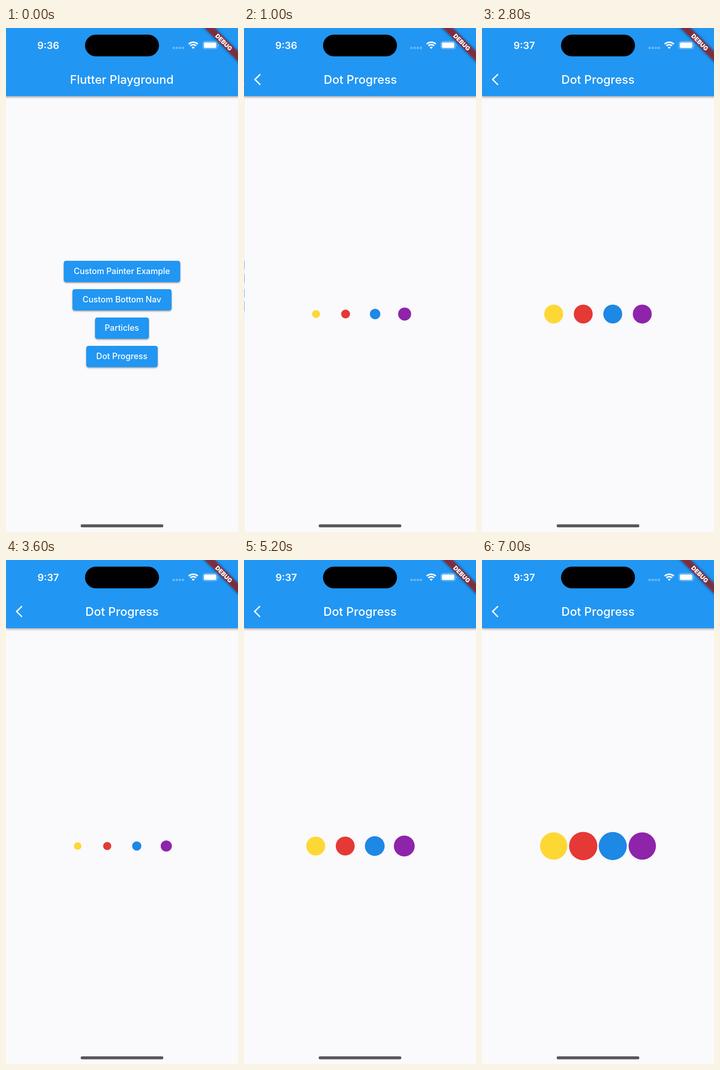
An HTML page that plays this animation: 508 px wide and 1102 px high, repeating every 7.1 s.

```html
<!DOCTYPE html>
<html lang="en">
<head>
<meta charset="utf-8">
<title>Dot Progress</title>
<style>
  html, body { margin: 0; width: 100%; height: 100%; overflow: hidden; background: #faf9fb; }
  svg { display: block; width: 508px; height: 1102px; font-family: Inter, Roboto, sans-serif; }
  text { fill: #fff; text-anchor: middle; }
  .bar { fill: #2196f3; filter: drop-shadow(0 2px 2.5px rgba(0, 0, 0, .36)); }
  .title { font-size: 25.9px; font-weight: 500; }
  .button { fill: #2196f3; filter: drop-shadow(0 2px 1.6px rgba(0, 0, 0, .36)); }
  .label { font-size: 18.1px; font-weight: 500; }
  .clock { font-size: 21.6px; font-weight: 600; }
  .debug { font-size: 13.2px; font-weight: 900; }
</style>
</head>
<body>
<svg viewBox="0 0 508 1102">
  <defs>
    <linearGradient id="edge">
      <stop offset="0" stop-opacity="0"/>
      <stop offset="1" stop-opacity=".1"/>
    </linearGradient>
    <filter id="soft" x="-20%" y="-100%" width="140%" height="300%">
      <feGaussianBlur stdDeviation="3.2"/>
    </filter>
  </defs>

  <g id="home">
    <rect width="508" height="1102" fill="#faf9fb"/>
    <rect class="bar" x="-20" y="-20" width="548" height="169"/>
    <text class="title" x="253.5" y="121.5">Flutter Playground</text>
    <g id="buttons"></g>
  </g>

  <g id="page">
    <rect x="-26" width="26" height="1102" fill="url(#edge)"/>
    <rect width="508" height="1102" fill="#faf9fb"/>
    <rect class="bar" x="0" y="-20" width="528" height="169"/>
    <path d="M35 101 23.2 112.6 35 124.3" fill="none" stroke="#fff" stroke-width="3"/>
    <text class="title" x="254" y="121.5">Dot Progress</text>
    <g id="dots"></g>
  </g>

  <g id="status">
    <text class="clock" id="clock" x="92.5" y="45.5">9:36</text>
    <rect x="173" y="14.5" width="162" height="47.5" rx="23.75"/>
    <g fill="#fff" fill-opacity=".33">
      <rect x="364.5" y="41" width="5" height="5" rx="1.5"/>
      <rect x="371.3" y="41" width="5" height="5" rx="1.5"/>
      <rect x="378.1" y="41" width="5" height="5" rx="1.5"/>
      <rect x="384.9" y="41" width="5" height="5" rx="1.5"/>
    </g>
    <g fill="none" stroke="#fff" stroke-width="3.3">
      <path d="M400 35.2A14.2 14.2 0 0 1 420 35.2"/>
      <path d="M403.7 39A9 9 0 0 1 416.3 39"/>
    </g>
    <path d="M406.6 42.3Q410 39.4 413.4 42.3L410 45.8Z" fill="#fff"/>
    <rect x="431.2" y="29.5" width="32" height="16.2" rx="5" fill="none" stroke="#fff" stroke-opacity=".45" stroke-width="1.3"/>
    <rect x="433.2" y="31.5" width="27.5" height="12.2" rx="3.2" fill="#fff"/>
    <path d="M465 35.2q2.4 2.4 0 4.8Z" fill="#fff" fill-opacity=".5"/>
  </g>

  <g transform="translate(508 0) rotate(45)">
    <rect x="-60" y="36.2" width="120" height="15.5" fill-opacity=".5" filter="url(#soft)"/>
    <rect x="-60" y="36.2" width="120" height="15.5" fill="#b71c1c" fill-opacity=".627"/>
    <text class="debug" y="48.8">DEBUG</text>
  </g>
  <rect x="163.5" y="1085.3" width="181" height="6.4" rx="3.2" fill="#58565a"/>
</svg>

<script>
const LOOP = 7100, STEP = 100;
const OPEN = 565, SLIDE = 450;
const CYCLE = 2543, STAGGER = 83;
const REST = 20.7, LOW = 7.76, HIGH = 31;
const SHRINK = 635, GROW = 635, SETTLE = 720;

const $ = id => document.getElementById(id);
const clamp = v => Math.min(1, Math.max(0, v));
const mix = (a, b, t) => a + (b - a) * t;

function add(parent, tag, attrs, text = '') {
  const el = document.createElementNS('http://www.w3.org/2000/svg', tag);
  for (const key in attrs) el.setAttribute(key, attrs[key]);
  el.textContent = text;
  return parent.appendChild(el);
}

function bezier(x1, y1, x2, y2) {
  const at = (a, b, s) => 3 * a * s * (1 - s) ** 2 + 3 * b * s * s * (1 - s) + s ** 3;
  return x => {
    if (x <= 0 || x >= 1) return clamp(x);
    let lo = 0, hi = 1;
    for (let i = 0; i < 24; i++) {
      const mid = (lo + hi) / 2;
      if (at(x1, x2, mid) < x) lo = mid; else hi = mid;
    }
    return at(y1, y2, lo);
  };
}
const ease = bezier(.25, .1, .25, 1);
const slideEase = bezier(.35, .91, .33, .97);

const buttons = [
  ['Custom Painter Example', 126.5, 255],
  ['Custom Bottom Nav', 145.5, 217],
  ['Particles', 195, 118],
  ['Dot Progress', 175.7, 156.5]
].map(([label, x, width], i) => {
  const y = 509 + i * 62;
  const box = { x, y, width, height: 46.5, rx: 5 };
  add($('buttons'), 'rect', { class: 'button', ...box });
  const glow = add($('buttons'), 'rect', { ...box, fill: '#fff', opacity: 0 });
  add($('buttons'), 'text', { class: 'label', x: x + width / 2 - .3, y: y + 29 }, label);
  return glow;
});

const dots = ['#fdd835', '#e53935', '#1e88e5', '#8e24aa'].map((fill, i) =>
  add($('dots'), 'circle', { cx: 157 + i * 64.65, cy: 625.4, fill }));

// Shrink, swell past the resting size, then settle.
function radius(t) {
  if (t <= 0) return REST;
  if (t < SHRINK) return mix(REST, LOW, ease(t / SHRINK));
  t -= SHRINK;
  if (t < GROW) return mix(LOW, HIGH, ease(t / GROW));
  return mix(HIGH, REST, clamp((t - GROW) / SETTLE));
}

function draw(time) {
  const since = time - OPEN;
  const slide = slideEase(clamp(since / SLIDE));
  $('home').setAttribute('transform', `translate(${-508 / 3 * slide} 0)`);
  $('page').setAttribute('transform', `translate(${508 * (1 - slide)} 0)`);
  $('page').style.display = since < 0 ? 'none' : '';
  buttons[3].setAttribute('opacity', time >= 500 ? .12 : 0);
  $('clock').textContent = time < 1400 ? '9:36' : '9:37';
  dots.forEach((dot, i) =>
    dot.setAttribute('r', radius(since < 0 ? 0 : since % CYCLE - i * STAGGER)));
}

const start = performance.now();
function tick() {
  const time = (performance.now() - start) % LOOP;
  draw(Math.floor(time / STEP) * STEP);
  requestAnimationFrame(tick);
}
tick();
</script>
</body>
</html>
```
